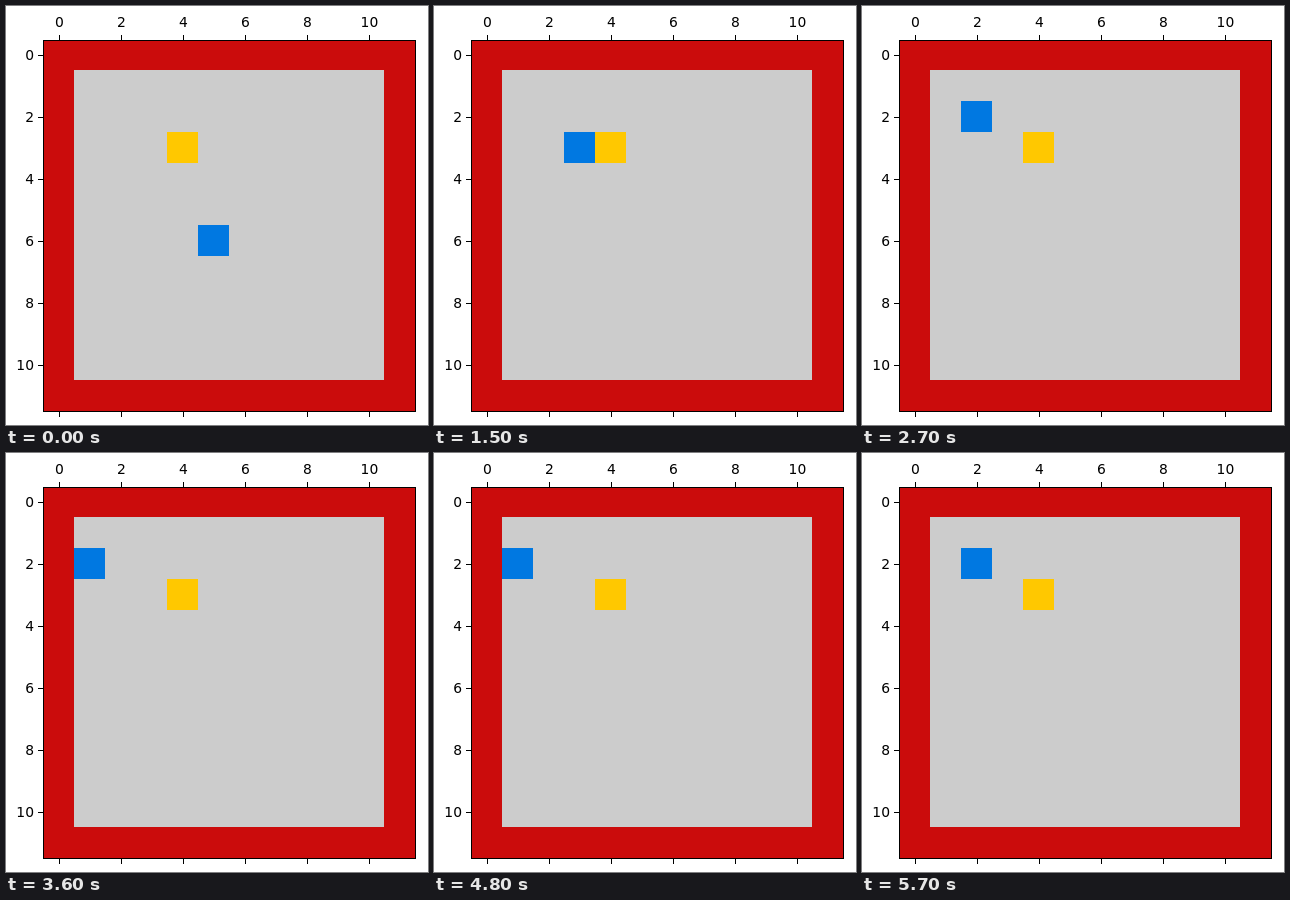
Recreate the animation shown at these times as an HTML page. Size 422 by 419 pixels, loop 6 s.

```html
<!DOCTYPE html>
<html lang="en">
<head>
<meta charset="utf-8">
<title>Grid walk</title>
<style>
  html, body { margin: 0; width: 100%; height: 100%; overflow: hidden; background: #fff; }
  svg { display: block; }
  text { font: 13.89px "DejaVu Sans", sans-serif; }
</style>
</head>
<body>
<svg id="stage" width="422" height="419" viewBox="0 0 422 419"></svg>
<script>
const stage = document.getElementById('stage');
const CELL = 31, LEFT = 37, TOP = 33, STEP_MS = 300;

function add(tag, attrs, label) {
  const el = document.createElementNS('http://www.w3.org/2000/svg', tag);
  for (const key in attrs) el.setAttribute(key, attrs[key]);
  if (label !== undefined) el.textContent = label;
  return stage.appendChild(el);
}
const rect = (x, y, width, height, fill = '#000') => add('rect', { x, y, width, height, fill });
const cells = (col, row, size, fill) =>
  rect(LEFT + col * CELL, TOP + row * CELL, size * CELL, size * CELL, fill);

// Board
cells(0, 0, 12, '#cb0c0c');
cells(1, 1, 10, '#cccccc');
cells(4, 3, 1, '#ffc800');
const walker = cells(0, 0, 1, '#0078e1');

// Axes frame; the strip above it hides the board's overhang
rect(37, 33, 373, 1, '#fff');
rect(37, 34, 373, 1);
rect(37, 405, 373, 1);
rect(37, 34, 1, 372);
rect(409, 34, 1, 372);

// Ticks and labels
for (let n = 0; n <= 10; n += 2) {
  const x = 53 + n * CELL, y = 49 + n * CELL;
  rect(x, 29, 1, 5);
  rect(x, 406, 1, 5);
  rect(32, y, 5, 1);
  add('text', { x: x + 0.4, y: 21, 'text-anchor': 'middle' }, n);
  add('text', { x: 28, y: y + 5, 'text-anchor': 'end' }, n);
}

// Walk to the corner, then pace between two cells
const path = [[5, 6], [4, 6], [3, 6], [3, 5], [3, 4], [3, 3], [3, 2]];
while (path.length < 20) path.push([path.length % 2 ? 2 : 1, 2]);

const frames = [...path, path[path.length - 1]].map(([col, row]) => ({
  transform: `translate(${col * CELL}px, ${row * CELL}px)`,
  easing: 'step-end'
}));
walker.animate(frames, { duration: path.length * STEP_MS, iterations: Infinity });
</script>
</body>
</html>
```
